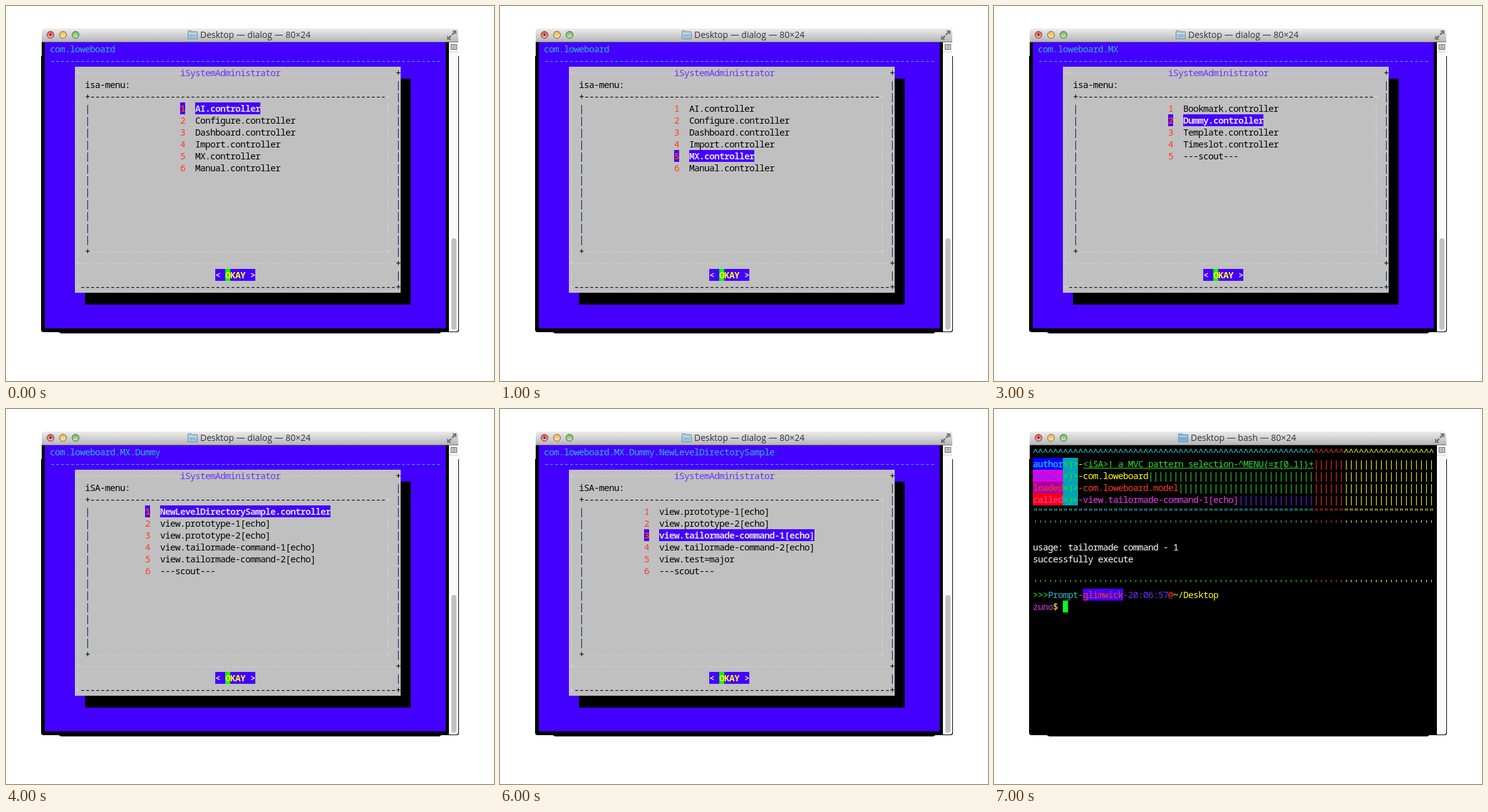
Animation, 779 px wide and 599 px high, one loop 8000 ms. Source, as an HTML page:

```html
<!DOCTYPE html>
<html lang="en">
<head>
<meta charset="utf-8">
<title>Terminal menu</title>
<style>
  html, body { margin: 0; width: 779px; height: 599px; overflow: hidden; background: #fff; }
  svg { position: absolute; left: 0; top: 0; }
  #screen span {
    position: absolute; height: 19px; white-space: pre;
    font: 500 14.5px/19px "Noto Sans Mono", monospace;
    letter-spacing: calc(8px - .6em);
  }
  #title { font: 14px "Open Sans", sans-serif; fill: #333; }
</style>
</head>
<body>
<svg width="779" height="599">
  <defs>
    <linearGradient id="bar" x2="0" y2="1">
      <stop stop-color="#ececec"/><stop offset="1" stop-color="#b4b4b4"/>
    </linearGradient>
    <linearGradient id="gloss" x2="0" y2="1">
      <stop stop-color="#fff" stop-opacity=".1"/><stop offset="1" stop-color="#fff" stop-opacity=".65"/>
    </linearGradient>
  </defs>
  <path d="M56 80H57V58H722V80H723V518Q723 521 719 521H695L692 523H88L84 521H60Q56 521 56 517Z"/>
  <path d="M57 58V41Q57 36 62 36H717Q722 36 722 41V58Z" fill="url(#bar)"/>
  <path d="M57 57.5H722" stroke="#777"/>
  <g id="lights"></g>
  <g id="folder">
    <path d="M.5 13.5V1.5Q.5 .5 1.5 .5H6L7.5 2H14.500Q15.500 2 15.500 3V13.500Z" stroke="#6d92ab"/>
    <path d="M1 4.500H15" stroke="#d8e9f4"/>
    <path d="M5.500 7V11M5.500 8.500H10.500V11" fill="none" stroke="#6d92ab" opacity=".6"/>
  </g>
  <text id="title" y="51"></text>
  <g fill="#777">
    <path d="M712 39H719V46L716.500 43.500L713 47L711 45L714.500 41.500Z"/>
    <path d="M704 47L706.500 49.500L709.500 46.500L711.500 48.500L708.500 51.500L711 54H704Z"/>
  </g>
  <path d="M707 58H722V516Q722 520 718 520H707Z" fill="#fafafa"/>
  <path d="M707 73.500H722" stroke="#ccc"/>
  <path d="M710.500 61.500H719.500V69.500H710.500Z" fill="#eee" stroke="#555"/>
  <path d="M712 64H718M712 67H718" stroke="#444"/>
  <rect id="thumb" x="711" width="8" rx="4" fill="#c1c1c1"/>
  <g id="panels">
    <rect x="62" y="58" width="640" height="457" fill="#4400ff"/>
    <rect x="126" y="116" width="520" height="361"/>
    <rect x="110" y="97" width="520" height="361" fill="#c0c0c0"/>
  </g>
</svg>
<div id="screen"></div>

<script>
const $ = id => document.getElementById(id);
const BLUE = '#4400ff', CYAN = '#2fb8cc', AQUA = '#1fe5e8', RED = '#ff3b1f', YELLOW = '#ffff1f',
  GREEN = '#2fe02f', PURPLE = '#6a30ff', MAGENTA = '#f03cf0', PALE = '#d2d2d2', NAVY = '#001a66';

$('lights').innerHTML = ['#e0443e', '#f0b03a', '#62b846'].map((color, i) =>
  `<circle cx="${71 + 20 * i}" cy="46" r="5.700" fill="${color}" stroke="#666" stroke-width=".8"/>
   <circle cx="${71 + 20 * i}" cy="46" r="4.500" fill="url(#gloss)"/>`).join('') +
  '<circle cx="71" cy="46" r="1.800" fill="#7a1712"/>';

function put(row, col, text, color = '#000', style = '') {
  const span = document.createElement('span');
  span.textContent = text;
  span.style.cssText = `left:${62 + 8 * col}px;top:${59 + 19 * row}px;color:${color};${style}`;
  $('screen').append(span);
}

// Writes [text, color, style] pieces one after another.
function line(row, ...pieces) {
  let col = 0;
  for (const [text, color, style] of pieces) {
    put(row, col, text, color, style);
    col += text.length;
  }
}

const on = color => `background:${color};`;
const bold = 'font-weight:bold;';

function drawDialog({ path, label, col, items }, selected) {
  put(0, 1, path, CYAN);
  put(1, 1, '-'.repeat(78), CYAN);
  put(2, 6, '+' + '-'.repeat(20), PALE);
  put(2, 27, 'iSystemAdministrator', PURPLE);
  put(2, 47, '-'.repeat(23), PALE);
  put(2, 70, '+');
  put(3, 8, label);
  put(4, 8, '+' + '-'.repeat(59));
  put(4, 68, '+', PALE);
  for (let row = 3; row < 20; row++) {
    if (row === 18) continue;
    put(row, 6, '|', PALE);
    put(row, 70, '|', NAVY);
    if (row > 4 && row < 17) {
      put(row, 8, '|', NAVY);
      put(row, 68, '|', PALE);
    }
  }
  put(17, 8, '+');
  put(17, 9, '-'.repeat(59) + '+', PALE);
  put(18, 6, '+' + '-'.repeat(63), PALE);
  put(18, 70, '+');
  put(20, 6, '+', PALE);
  put(20, 7, '-'.repeat(63) + '+');

  items.forEach((item, i) => {
    const active = i + 1 === selected;
    const style = active ? on(BLUE) + bold : '';
    put(5 + i, col, `${i + 1}`, RED, style);
    put(5 + i, col + 3, item, active ? '#dcdcdc' : '#000', style);
  });

  put(19, 34, '<      >', '#dcdcdc', on(BLUE) + bold);
  put(19, 36, 'O', YELLOW, on('#00ff00') + bold);
  put(19, 37, 'KAY', YELLOW, bold);
}

function drawShell() {
  const tail = char => [[char.repeat(6), RED], [char.repeat(18), YELLOW]];
  const rule = (row, char, color) => line(row, [char.repeat(56), color], ...tail(char));
  const entry = (row, name, nameColor, nameBack, text, color, barColor, dashColor = color, style) =>
    line(row, [name, nameColor, on(nameBack)], ['=)>', GREEN, on('#00a4b4')], ['-', dashColor],
      [text, color, style], ['|'.repeat(46 - text.length), barColor], ...tail('|'));

  rule(0, '^', AQUA);
  entry(1, 'author', AQUA, '#0000ff', '<iSA>! a MVC pattern selection-^MENU{=r[0.1]}+',
    GREEN, GREEN, YELLOW, 'text-decoration:underline');
  entry(2, 'domain', PURPLE, '#e000e0', 'com.loweboard', YELLOW, GREEN);
  entry(3, 'loaded', RED, '#a800a8', 'com.loweboard.model', RED, GREEN);
  entry(4, 'called', MAGENTA, '#ff0000', 'view.tailormade-command-1[echo]', MAGENTA, PURPLE);
  rule(5, '"', AQUA);
  rule(6, "'", GREEN);
  put(8, 0, 'usage: tailormade command - 1', '#fff');
  put(9, 0, 'successfully execute', '#fff');
  rule(11, "'", GREEN);
  line(12, ['>>>', GREEN], ['Prompt', CYAN], ['-', RED], ['glimwick', RED, on(BLUE)],
    ['-20:06:57', PURPLE], ['@', RED], ['~/Desktop', YELLOW]);
  line(13, ['zuno', '#d838d8'], ['$ ', YELLOW], [' ', '', on('#00ff20')]);
}

const echoes = ['view.prototype-1[echo]', 'view.prototype-2[echo]',
  'view.tailormade-command-1[echo]', 'view.tailormade-command-2[echo]'];
const controllers = names => names.split(' ').map(name => name + '.controller');
const scout = '---scout---';
const root = {
  path: 'com.loweboard', label: 'isa-menu:', col: 27, top: 371,
  items: controllers('AI Configure Dashboard Import MX Manual')
};
const mx = {
  path: 'com.loweboard.MX', label: 'isa-menu:', col: 27, top: 371,
  items: [...controllers('Bookmark Dummy Template Timeslot'), scout]
};
const dummy = {
  path: 'com.loweboard.MX.Dummy', label: 'iSA-menu:', col: 20, top: 297,
  items: [...controllers('NewLevelDirectorySample'), ...echoes, scout]
};
const sample = {
  path: 'com.loweboard.MX.Dummy.NewLevelDirectorySample', label: 'iSA-menu:', col: 21, top: 297,
  items: [...echoes, 'view.test=major', scout]
};

// One step per second: [menu, selected item]; an empty step shows the shell.
const steps = [[root, 1], [root, 5], [mx, 1], [mx, 2], [dummy, 1], [sample, 1], [sample, 3], []];

function show([menu, selected]) {
  $('screen').replaceChildren();
  $('title').textContent = `Desktop — ${menu ? 'dialog' : 'bash'} — 80×24`;
  $('title').setAttribute('x', menu ? 310 : 314);
  $('folder').setAttribute('transform', `translate(${menu ? 290 : 294} 39)`);
  $('folder').setAttribute('fill', menu ? '#a5c5d9' : '#78b5dc');
  $('panels').setAttribute('visibility', menu ? 'visible' : 'hidden');
  $('thumb').setAttribute('y', menu ? menu.top : 0);
  $('thumb').setAttribute('height', menu ? 517 - menu.top : 0);
  if (menu) drawDialog(menu, selected);
  else drawShell();
}

let start, current;
function tick(now) {
  start ??= now;
  const index = Math.floor((now - start) / 1000) % steps.length;
  if (index !== current) show(steps[current = index]);
  requestAnimationFrame(tick);
}
requestAnimationFrame(tick);
</script>
</body>
</html>
```
